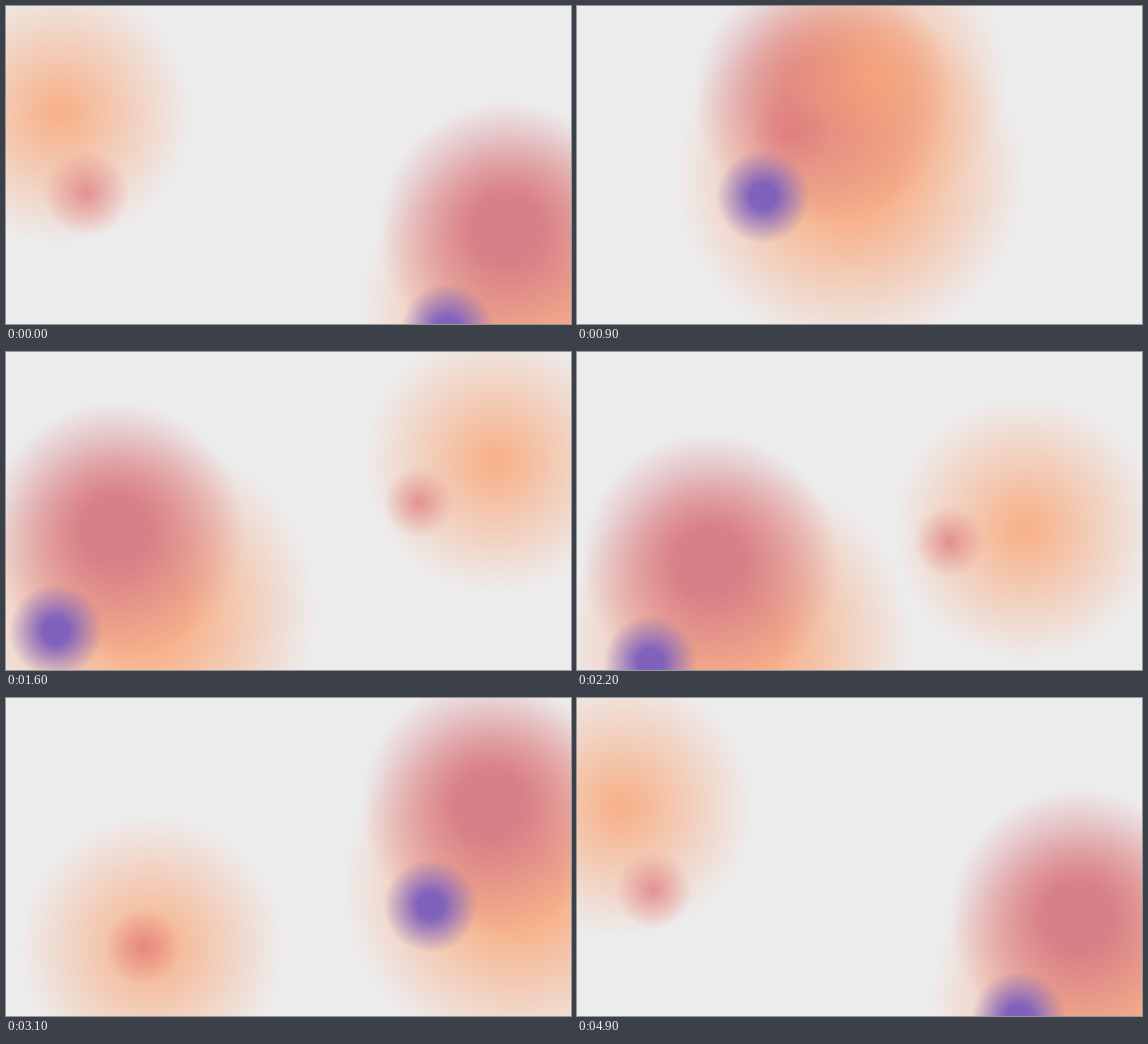
Animation, 600 px wide and 338 px high, one loop 5000 ms. Source, as an HTML page with a canvas:

```html
<!DOCTYPE html>
<html lang="en">
<head>
<meta charset="utf-8">
<title>Drifting gradients</title>
<style>
  html, body { margin: 0; width: 100%; height: 100%; overflow: hidden; background: #edeced; }
  canvas { display: block; width: 600px; height: 338px; }
</style>
</head>
<body>
<canvas id="stage" width="600" height="338"></canvas>
<script>
const ctx = document.getElementById('stage').getContext('2d');
const LOOP = 5000, STEP = 100;
const ORANGE = '249,166,118', ROSE = '216,128,136', VIOLET = '128,97,188', CORAL = '222,122,125';

// Sine ease from 0 to 1.
function ease(t, start, length) {
  const u = Math.min(Math.max((t - start) / length, 0), 1);
  return (1 - Math.cos(Math.PI * u)) / 2;
}

const bell = (s, width, power = 2) => Math.exp(-Math.pow(Math.abs(s) / width, power));

// Gentle rise, quick fall.
const swing = (s, rise, fall) => s < 0 ? bell(s, rise) : bell(s, fall, 4);

// Quick rise, slow settling.
const hop = s => s < 0 ? bell(s, .47) : 1 / (1 + (s / .39) ** 2);

// Each group crosses the stage and comes back.
function clusterAt(t) {
  const out = ease(t, .14, 1.27), back = ease(t, 2, 1.27);
  return {
    x: 469 - 416 * (out - back),
    y: 346 - 155 * Math.max(hop(t - 1.03), hop(t - 2.91))
  };
}

function haloAt(t) {
  const out = ease(t, .215, 1.27), back = ease(t, 1.835, 1.85);
  return {
    x: 57 + 463 * out - 473 * back,
    y: 115 - 38 * bell(t - .85, .45) + 186 * swing(t - 2.78, .6, .47)
  };
}

function spotAt(t) {
  const out = ease(t, .22, 1.6), back = ease(t, 1.695, 1.93);
  return {
    x: 85 + 370 * out - 374 * back,
    y: 204 - 77 * bell(t - 1.1, .67) + 61 * swing(t - 3, .46, .35),
    r: 46 - 9 * out + 4 * back
  };
}

// Solid core, then a linear fade to the rim.
function blob(x, y, r, rgb, alpha, core) {
  const g = ctx.createRadialGradient(x, y, r * core, x, y, r);
  g.addColorStop(0, `rgba(${rgb},${alpha})`);
  g.addColorStop(1, `rgba(${rgb},0)`);
  ctx.fillStyle = g;
  ctx.fillRect(x - r, y - r, 2 * r, 2 * r);
}

function draw(t) {
  ctx.fillStyle = '#edeced';
  ctx.fillRect(0, 0, 600, 338);
  const c = clusterAt(t), h = haloAt(t), s = spotAt(t);
  blob(c.x + 92, c.y - 22, 185, ORANGE, .83, .25);
  blob(c.x + 63, c.y - 107, 137, ROSE, 1, .27);
  blob(c.x, c.y, 50, VIOLET, 1, .27);
  blob(h.x, h.y, 140, ORANGE, .84, .04);
  blob(s.x, s.y, s.r, CORAL, .74, 0);
}

function tick() {
  const ms = performance.now() % LOOP;
  draw(Math.floor(ms / STEP) * STEP / 1000);
  requestAnimationFrame(tick);
}
tick();
</script>
</body>
</html>
```
